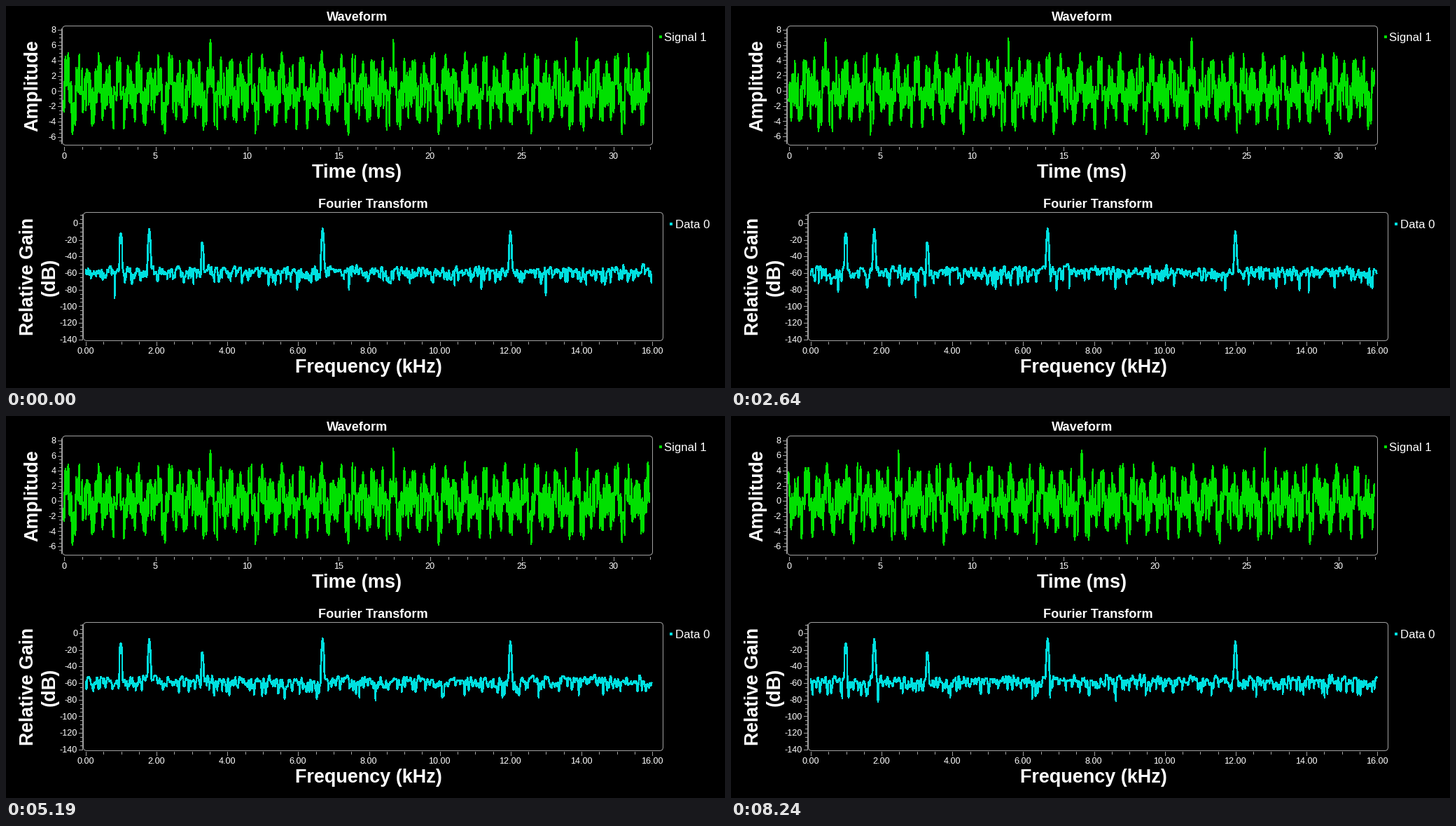
A matplotlib script that plays this animation: 1027 px wide and 545 px high, repeating every 8330 ms.

```python
import numpy as np
import matplotlib.pyplot as plt
from matplotlib.animation import FuncAnimation
from matplotlib.patches import FancyBboxPatch, Rectangle

W, H, DPI = 1027, 545, 100
PX = 72 / DPI
LOOP, FRAMES = 8330, 238
INTERVAL = LOOP // FRAMES
GREEN, CYAN, GREY = "#00e000", "#00e0e0", "#a0a0a0"

# Both displays refresh on a 252 ms clock, often skipping every other tick
TICKS = np.r_[-1:1, 1:10:2, 10:12, 12:21:2, 21:23, 23:28:2, 28:33:2]
UPDATES = 110 + 252 * TICKS

# The trigger drifts along the 10 ms burst in whole 2 ms steps
DRIFT = np.interp(TICKS, [-1, 5, 10, 16, 22, 27, 32],
                  [8, 18, 32, 42, 50, 66, 76])
PHASES = 2 * np.round(DRIFT / 2) % 10

# kHz: amplitude
TONES = {1.0: 1.05, 1.8: 1.9, 3.3: 0.3, 6.7: 2.2, 12.0: 1.35}
RATE, SHOWN, N = 32, 1024, 2048
NOISE, GAIN = 0.09, 0.228

time = np.arange(N) / RATE
freq = np.arange(N // 2) * RATE / N
angle = 2 * np.pi * np.arange(N) / N
# Blackman-Harris
window = (0.35875 - 0.48829 * np.cos(angle) + 0.14128 * np.cos(2 * angle)
          - 0.01168 * np.cos(3 * angle))


def time_x(ms):
    return 82.5 + 26.16 * ms


def freq_x(khz):
    return 113.5 + 50.57 * khz


def gain_y(db):
    return 309.3 - 1.186 * db


def measure(phase, seed):
    """Waveform samples and spectrum in dB for one refresh."""
    signal = np.random.default_rng(seed).normal(0, NOISE, N)
    for f, amplitude in TONES.items():
        signal += amplitude * np.cos(2 * np.pi * f * (time - phase))
    bins = np.abs(np.fft.rfft(signal * window))[:N // 2]
    return signal[:SHOWN], 20 * np.log10(bins * GAIN * 2 / window.sum())


DATA = [measure(phase, 100 + i) for i, phase in enumerate(PHASES)]

fig = plt.figure(figsize=(W / DPI, H / DPI), dpi=DPI, facecolor="black")
ax = fig.add_axes([0, 0, 1, 1])
ax.set(xlim=(0, W), ylim=(H, 0))
ax.axis("off")


def text(x, y, s, size, bold=False, ha="center", rotation=0):
    return ax.text(x, y, s, color="white", family="Liberation Sans",
                   fontsize=size * PX, weight="bold" if bold else "normal",
                   ha=ha, va="baseline", rotation=rotation,
                   rotation_mode="anchor")


def line(xs=(), ys=(), color=GREY, width=1, **kw):
    return ax.plot(xs, ys, color=color, lw=width * PX, **kw)[0]


def trace(color):
    return line(color=color, width=1.8, antialiased=False,
                solid_joinstyle="bevel")


def panel(x0, y0, x1, y1):
    ax.add_patch(FancyBboxPatch(
        (x0 + 5, y0 + 5), x1 - x0 - 10, y1 - y0 - 10,
        boxstyle="round,pad=5,rounding_size=5", fc="none", ec=GREY, lw=PX))


def ticks(base, places, lengths):
    """Tick segments from a base line, as gap-separated points."""
    along = np.repeat(np.floor(places) + 0.5, 3)
    across = np.ravel([(base, base + n, np.nan) for n in lengths])
    return along, across


def bottom_axis(base, to_x, end, minor, per_major, label):
    values = np.arange(0, end + minor / 2, minor)
    major = np.arange(len(values)) % per_major == 0
    line(*ticks(base, to_x(values), np.where(major, 5, 3)))
    for v in values[major]:
        text(to_x(v), base + 17, label.format(v), 12.6)


def legend(x, y, color, s):
    ax.add_patch(Rectangle((x, y), 4, 4, fc=color, lw=0))
    text(x + 7.5, y + 8, s, 16.7, ha="left")


panel(80.5, 28.5, 923.5, 198.5)
panel(110.5, 294.5, 938.5, 477.5)

text(501.5, 21, "Waveform", 18.2, True)
text(524.5, 287.5, "Fourier Transform", 18.1, True)
text(501, 245, "Time (ms)", 27.2, True)
text(518, 523, "Frequency (kHz)", 27, True)
text(45, 113.5, "Amplitude", 26.8, True, rotation=90)
text(39, 386, "Relative Gain", 26.6, True, rotation=90)
text(70, 387, "(dB)", 27.2, True, rotation=90)
legend(933, 42, GREEN, "Signal 1")
legend(948, 309, CYAN, "Data 0")

bottom_axis(201, time_x, 32, 1, 5, "{:.0f}")
bottom_axis(479, freq_x, 16, 0.5, 4, "{:.2f}")

# Gain axis
line((108.5, 108.5), (gain_y(10), gain_y(-140)))
gains = np.arange(-140, 11, 5)
places, ends = ticks(108.5, gain_y(gains), np.where(gains % 20 == 0, -5, -3))
line(ends, places)
for db in range(-140, 1, 20):
    text(102, gain_y(db) + 4.7, str(db), 12.6, ha="right")

# Amplitude axis follows the extremes of each waveform
line((78.5, 78.5), (32, 196))
amp_ticks = line()
amp_labels = {v: text(71.5, 0, str(v), 12.6, ha="right")
              for v in range(-6, 9, 2)}
wave_line = trace(GREEN)
gain_line = trace(CYAN)


def update(frame):
    now = (frame + 0.5) * INTERVAL
    wave, gain = DATA[np.searchsorted(UPDATES, now, side="right") - 1]
    top, scale = wave.max(), 137.5 / np.ptp(wave)

    def amp_y(v):
        return 46.3 + (top - v) * scale

    values = np.arange(-7.5, 8.6, 0.5)
    values = values[(amp_y(values) > 32) & (amp_y(values) < 196)]
    places, ends = ticks(78.5, amp_y(values), np.where(values % 2 == 0, -5, -3))
    amp_ticks.set_data(ends, places)
    for v, label in amp_labels.items():
        label.set_y(amp_y(v) + 4.7)
    wave_line.set_data(np.round(time_x(time[:SHOWN])), np.round(amp_y(wave)))
    gain_line.set_data(np.round(freq_x(freq)), np.round(gain_y(gain)))
    return [amp_ticks, wave_line, gain_line, *amp_labels.values()]


anim = FuncAnimation(fig, update, frames=FRAMES, interval=INTERVAL,
                     repeat=True, repeat_delay=0, blit=False)
plt.show()
```
